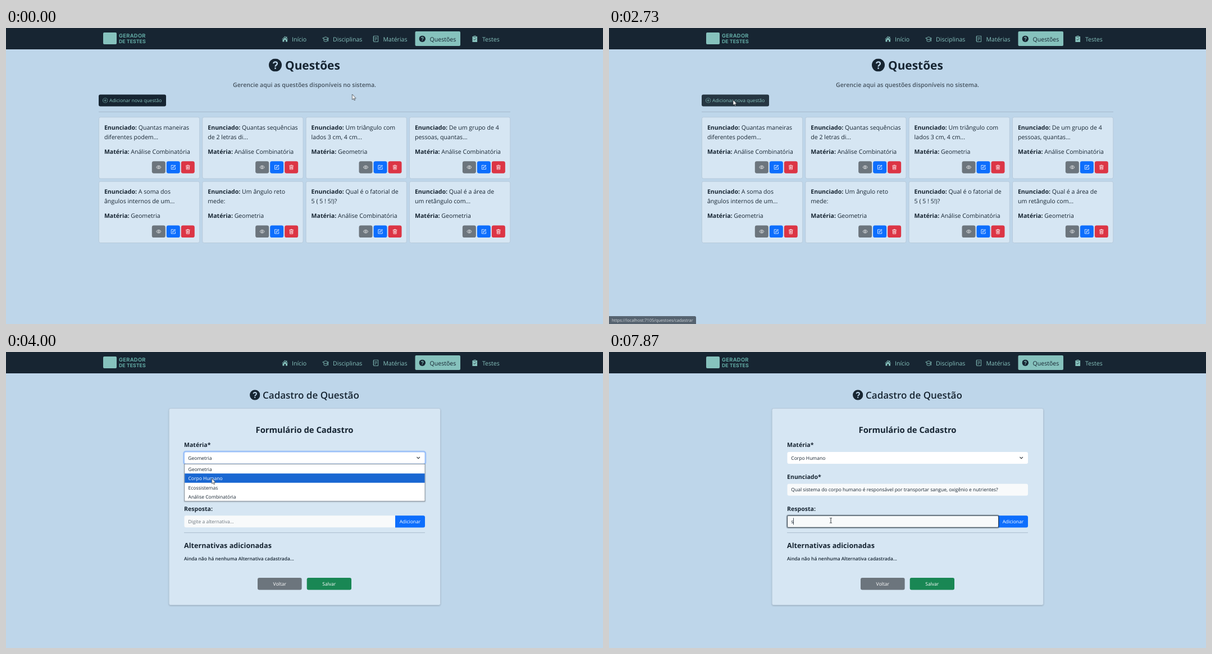
An HTML page for the animation above (8 s loop, 1063 by 527 pixels).

```html
<!DOCTYPE html>
<html lang="pt-BR">
<head>
<meta charset="utf-8">
<title>Questões</title>
<style>
html, body { margin: 0; width: 100%; height: 100%; overflow: hidden; background: #bed6ea; }
svg { display: block; }
#stage {
  width: 1063px; height: 527px; --ink: #172532; --teal: #86c2bd; --q: #bed6ea;
  font-family: "Open Sans", "Noto Sans", sans-serif; font-size: 10.58px;
  fill: var(--ink); color: var(--ink); text-rendering: geometricPrecision;
}
.b { font-weight: 700; }
.semi { font-weight: 600; }
.s { font-size: 8.53px; }
.mid { text-anchor: middle; }
.teal { fill: var(--teal); color: var(--teal); }
.white { fill: #fff; color: #fff; }
.hint { fill: #6c757d; }
.rule { stroke: #9fb2c4; stroke-width: .8; }
.panel { fill: #d6e6f3; stroke: #b3c6d7; stroke-width: .8; }
.brand { font: 700 9.3px Inter, sans-serif; fill: #62aaa4; }
.tip { font-size: 7.42px; fill: #cfd4d8; }
.ring { fill: none; stroke-width: 2.8; }
.blue { stroke: #9dc2f8; }

/* One percent of the loop is 80 ms. */
.anim, .list, .form { animation: 8s step-end infinite; }
.list { animation-name: list; }
.form { animation-name: form; }
@keyframes list { 0% { visibility: visible } 35.875%, 100% { visibility: hidden } }
@keyframes form { 0% { visibility: hidden } 35.875%, 100% { visibility: visible } }

.eyeHover { fill: #6c757d; animation: eyeHover 8s linear infinite; }
@keyframes eyeHover { 0%, 11.6% { fill: #6c757d } 13.4%, 19.5% { fill: #5c636a } 21.4%, 100% { fill: #6c757d } }
.addHover { animation: addHover 8s linear infinite; }
@keyframes addHover { 0%, 31% { fill: #172532 } 32.9%, 100% { fill: #263642 } }

.tipView { animation: tipView 8s linear infinite; }
@keyframes tipView { 0%, 12% { opacity: 0 } 14.2%, 21.2% { opacity: 1 } 23.7%, 100% { opacity: 0 } }
.tipAdd { animation: tipAdd 8s linear infinite; }
@keyframes tipAdd { 0%, 31.6% { opacity: 0 } 33.2%, 35.874% { opacity: 1 } 35.875%, 100% { opacity: 0 } }

.menu { animation-name: menu; }
@keyframes menu { 0% { opacity: 0 } 44.2% { opacity: 1 } 53.375%, 100% { opacity: 0 } }
.row1 { animation-name: row1; }
@keyframes row1 { 0% { opacity: 1 } 50%, 100% { opacity: 0 } }
.row2 { animation-name: row2; }
@keyframes row2 { 0% { opacity: 0 } 50%, 100% { opacity: 1 } }
.light1 { animation-name: light1; }
@keyframes light1 { 0% { fill: #fff } 50%, 100% { fill: #172532 } }
.light2 { animation-name: light2; }
@keyframes light2 { 0% { fill: #172532 } 50%, 100% { fill: #fff } }
.before { animation-name: before; }
@keyframes before { 0% { opacity: 1 } 53.375%, 100% { opacity: 0 } }
.after { animation-name: after; }
@keyframes after { 0% { opacity: 0 } 53.375%, 100% { opacity: 1 } }

.ringSelect { animation: ringSelect 8s linear infinite; }
@keyframes ringSelect { 0%, 45% { opacity: 0 } 46.9%, 65.6% { opacity: 1 } 66.7%, 100% { opacity: 0 } }
.ringText { animation: ringText 8s linear infinite; }
@keyframes ringText { 0%, 65.6% { opacity: 0 } 66.7%, 87.5% { opacity: 1 } 89.4%, 100% { opacity: 0 } }
.ringAnswer { animation: ringAnswer 8s linear infinite; }
@keyframes ringAnswer { 0%, 87.5% { opacity: 0 } 89.4%, 100% { opacity: 1 } }

.askHint { animation-name: askHint; }
@keyframes askHint { 0% { opacity: 1 } 77.5%, 100% { opacity: 0 } }
.ask { animation-name: ask; }
@keyframes ask { 0% { opacity: 0 } 77.5%, 100% { opacity: 1 } }
.replyHint { animation-name: replyHint; }
@keyframes replyHint { 0% { opacity: 1 } 98.375%, 100% { opacity: 0 } }
.reply { animation-name: reply; }
@keyframes reply { 0% { opacity: 0 } 98.375%, 100% { opacity: 1 } }
.caret1 { animation-name: caret1; }
@keyframes caret1 { 0% { opacity: 0 } 65.875% { opacity: 1 } 72.5%, 100% { opacity: 0 } }
.caret2 { animation-name: caret2; }
@keyframes caret2 { 0% { opacity: 0 } 77.5% { opacity: 1 } 84.125%, 100% { opacity: 0 } }
.caret3 { animation-name: caret3; }
@keyframes caret3 { 0% { opacity: 0 } 87.5% { opacity: 1 } 94.125%, 100% { opacity: 0 } }

.cursor { animation: move 8s linear infinite; }
@keyframes move {
  0%, .875% { transform: translate(616.5px, 118px) }
  1.75% { transform: translate(611px, 112.5px); animation-timing-function: cubic-bezier(.35, .1, .5, 1) }
  10.875% { transform: translate(264px, 230.5px) }
  14.5%, 19.125% { transform: translate(271px, 245px) }
  23.375% { transform: translate(241px, 194px) }
  25%, 28.375% { transform: translate(233px, 147px) }
  33.5%, 39.125% { transform: translate(221px, 128px); animation-timing-function: ease-in-out }
  44.4%, 46.5% { transform: translate(348px, 192px) }
  50%, 57.5% { transform: translate(366.5px, 225px) }
  61.625%, 80% { transform: translate(371px, 247px) }
  81.625% { transform: translate(372.5px, 271px) }
  86.625%, 100% { transform: translate(395px, 300px) }
}
.arrow { fill: #fff; stroke: #20262c; stroke-width: .7; animation-name: arrow; }
.beam { fill: none; stroke: #20262c; stroke-width: .9; animation-name: beam; }
@keyframes arrow { 0%, 24.1%, 80.5% { opacity: 1 } 21.6%, 59.2%, 85%, 100% { opacity: 0 } }
@keyframes beam { 0%, 24.1%, 80.5% { opacity: 0 } 21.6%, 59.2%, 85%, 100% { opacity: 1 } }
</style>
</head>
<body>
<svg id="stage" viewBox="0 0 1063 527">
  <defs>
    <filter id="soft" x="-10%" y="-10%" width="120%" height="130%">
      <feDropShadow dx="0" dy="1" stdDeviation="1.2" flood-opacity=".22"/>
    </filter>
    <g fill="none" stroke="currentColor" stroke-width="1.2">
      <symbol id="home" viewBox="0 0 16 16"><path fill="currentColor" stroke="none" d="M8 .8.6 8.2l.9.8L8 2.6 14.5 9l.9-.8-2.4-2.4V2h-2v1.8zM8 4l6 6v4.5H9.8V10H6.2v4.5H2V10z"/></symbol>
      <symbol id="cap" viewBox="0 0 16 16"><path fill="none" stroke="currentColor" stroke-width="1.2" d="M1 5.6 8.2 2.4 15 5.6 8 9.2zM4 7.6v4.6c2 1.4 5 2 8 .3V7.6M14 6.2V13"/></symbol>
      <symbol id="book" viewBox="0 0 16 16"><path fill="none" stroke="currentColor" stroke-width="1.2" d="M3 .8h11v14.4H3zM1 4h3M1 8h3M1 12h3M6 5h5.5M6 8h5.5M6 11h3"/></symbol>
      <symbol id="ask" viewBox="0 0 16 16"><circle cx="8" cy="8" r="8" fill="currentColor"/><path fill="none" stroke="var(--q)" stroke-width="1.6" d="M5.7 6.1C5.7 3.4 10.4 3.4 10.4 6.2 10.4 8 8 8 8 9.9M8 11v1.8"/></symbol>
      <symbol id="clip" viewBox="0 0 16 16"><path fill="currentColor" d="M2 2h3V.5h6V2h3v14H2z"/><path fill="none" stroke="#172532" stroke-width="1.2" d="M5 3.2h6M5 9l2.2 2.2L11.2 7"/></symbol>
      <symbol id="eye" viewBox="0 0 16 16"><path fill="none" stroke="currentColor" stroke-width="1.3" d="M.8 8C4 1.7 12 1.7 15.2 8 12 14.3 4 14.3.8 8z"/><circle cx="8" cy="8" r="2.4" fill="none" stroke="currentColor" stroke-width="1.3"/></symbol>
      <symbol id="edit" viewBox="0 0 16 16"><path fill="none" stroke="currentColor" stroke-width="1.4" d="M9 2H1.7v12.5h12.6V8M5.6 10.6l.6-2.6L13 1.2l2 2L8.2 10zM11.6 2.6l2 2"/></symbol>
      <symbol id="bin" viewBox="0 0 16 16"><path fill="none" stroke="currentColor" stroke-width="1.3" d="M1.5 3.2h13M6 3V1.2h4V3M3 3.5l.6 11.7h8.8L13 3.5M5.8 5.5v7.5M8 5.5v7.5M10.2 5.5v7.5"/></symbol>
      <symbol id="plus" viewBox="0 0 16 16"><path fill="none" stroke="currentColor" stroke-width="1.2" d="M8 .7a7.3 7.3 0 1 0 .01 0zM8 4v8M4 8h8"/></symbol>
    </g>
  </defs>

  <rect width="1063" height="527" fill="#bed6ea"/>
  <rect width="1063" height="38" fill="#172532"/>
  <rect x="173" y="8" width="24" height="21" rx="2" class="teal"/>
  <g class="brand">
    <text x="201" y="17" letter-spacing=".3">GERADOR</text>
    <text x="201" y="27" font-size="8.8">DE TESTES</text>
  </g>
  <g class="teal">
    <use href="#home" x="491" y="14" width="11.5" height="11.5"/><text x="509" y="24">Início</text>
    <use href="#cap" x="563" y="14" width="12" height="12"/><text x="582" y="24">Disciplinas</text>
    <use href="#book" x="652.5" y="13.5" width="11.5" height="11.5"/><text x="671.5" y="24">Matérias</text>
    <use href="#clip" x="829" y="13.5" width="11.5" height="11.5"/><text x="848" y="24">Testes</text>
    <rect x="728.5" y="6" width="80.5" height="26" rx="2"/>
  </g>
  <use href="#ask" x="735.5" y="13.5" width="11.5" height="11.5" style="--q: #86c2bd"/>
  <text x="754.5" y="24">Questões</text>

  <g class="list">
    <use href="#ask" x="468" y="54.5" width="23" height="23"/>
    <text x="497" y="73.7" class="b" font-size="20.9">Questões</text>
    <text x="531.5" y="105" class="semi mid" fill="#45525e">Gerencie aqui as questões disponíveis no sistema.</text>
    <rect x="165" y="118.5" width="120" height="21" rx="3" class="addHover"/>
    <g class="teal">
      <use href="#plus" x="172" y="124.3" width="9.3" height="9.3"/>
      <text x="184" y="132.3" class="s">Adicionar nova questão</text>
    </g>
    <path class="rule" d="M165 149.3H898"/>
    <g id="cards"></g>
    <g class="tipView">
      <path fill="#566370" d="M0 513H307q2.5 0 2.5 2.5V527H0z"/>
      <text x="5" y="522.7" class="tip">https://localhost:7105/questoes/detalhes/2dc259b8-bbae-4ddd-a288-0eb3205764ef</text>
    </g>
    <g class="tipAdd">
      <path fill="#566370" d="M0 513H152.500q2.500 0 2.500 2.500V527H0z"/>
      <text x="5" y="522.7" class="tip">https://localhost:7105/questoes/cadastrar</text>
    </g>
  </g>

  <g class="form">
    <use href="#ask" x="434" y="67.3" width="18.4" height="18.4"/>
    <text x="457" y="83" class="semi" font-size="17">Cadastro de Questão</text>
    <rect x="290.200" y="100.400" width="483.300" height="350.200" rx="3" class="panel" filter="url(#soft)"/>
    <text x="531.5" y="143.700" class="b mid" font-size="14.8">Formulário de Cadastro</text>
    <g class="b">
      <text x="317" y="169.300">Matéria*</text>
      <text x="317" y="226">Enunciado*</text>
      <text x="317" y="282.700">Resposta:</text>
      <text x="317" y="349" font-size="12.6">Alternativas adicionadas</text>
    </g>
    <path class="rule" d="M317 321.700H746"/>
    <text x="317" y="371.300" class="semi" font-size="8.42">Ainda não há nenhuma Alternativa cadastrada...</text>

    <rect x="317.500" y="178" width="428.500" height="21" rx="3" fill="#fff"/>
    <rect x="317.500" y="234.700" width="428.500" height="21" rx="3" fill="#f8fafb"/>
    <path fill="#f8fafb" d="M693 291.300V312.300H320.500q-3 0-3-3V294.300q0-3 3-3z"/>
    <path fill="#0d6efd" d="M693 291.200H743q3 0 3 3V309.400q0 3-3 3H693z"/>
    <rect x="448" y="402" width="78.600" height="21.500" rx="3" fill="#6c757d"/>
    <rect x="535.700" y="402" width="79.300" height="21.500" rx="3" fill="#198754"/>
    <path d="M731.500 187l2.700 2.700 2.700-2.700" fill="none" stroke="#343a40" stroke-width="1.100"/>

    <rect class="ring blue ringSelect" x="316.600" y="177.100" width="430.300" height="22.800" rx="3.500"/>
    <g class="ringText" fill="none">
      <rect x="316.600" y="233.800" width="430.300" height="22.800" rx="3.500" stroke="#1725324d" stroke-width="2"/>
      <rect x="317.500" y="234.700" width="428.500" height="21" rx="3" stroke="#33414d"/>
    </g>
    <g class="ringAnswer" fill="none">
      <rect x="316.600" y="290.400" width="377.500" height="22.800" rx="2.500" stroke="#1725324d" stroke-width="2"/>
      <rect x="317.500" y="291.300" width="376" height="21" rx="2" stroke="#33414d"/>
    </g>

    <g class="s">
      <g class="white mid">
        <text x="719.500" y="305">Adicionar</text>
        <text x="487.300" y="416">Voltar</text>
        <text x="575.300" y="416">Salvar</text>
      </g>
      <text x="324.300" y="192" class="anim before">Geometria</text>
      <text x="324.300" y="192" class="anim after">Corpo Humano</text>
      <text x="324.300" y="248.300" class="hint anim askHint">Digite o enunciado da questão...</text>
      <text x="324.300" y="248.300" class="anim ask">Qual sistema do corpo humano é responsável por transportar sangue, oxigênio e nutrientes?</text>
      <text x="324.300" y="305" class="hint anim replyHint">Digite a alternativa...</text>
      <text x="324.300" y="305" class="anim reply">s</text>
    </g>
    <rect class="anim caret1" x="325" y="239" width=".8" height="12"/>
    <rect class="anim caret2" x="694.200" y="239" width=".8" height="12"/>
    <rect class="anim caret3" x="325" y="295.500" width=".8" height="12"/>
    <rect class="anim reply" x="328.200" y="295.500" width=".8" height="12"/>

    <g class="anim menu s">
      <rect x="317.800" y="199.400" width="428.200" height="66.300" fill="#fff" stroke="#6f7a84" stroke-width=".8" filter="url(#soft)"/>
      <rect class="anim row1" x="318.200" y="199.800" width="427.400" height="16.500" fill="#1967d2"/>
      <rect class="anim row2" x="318.200" y="216.300" width="427.400" height="16.500" fill="#1967d2"/>
      <text x="324.500" y="211.600" class="anim light1">Geometria</text>
      <text x="324.500" y="228.100" class="anim light2">Corpo Humano</text>
      <text x="324.500" y="244.600">Ecossistemas</text>
      <text x="324.500" y="261.100">Análise Combinatória</text>
    </g>
  </g>

  <g class="cursor">
    <path class="anim arrow" d="M0 0V9.600L2.200 7.600 3.700 10.800 5.100 10.200 3.700 7.100H6.500z"/>
    <path class="anim beam" d="M-2-4.300H-.5L0-3.800.5-4.300H2M0-3.800V3.800M-2 4.300H-.5L0 3.800.5 4.300H2"/>
  </g>
</svg>
<script>
const algebra = 'Análise Combinatória', shapes = 'Geometria';
const cards = [
  ['Quantas maneiras', 'diferentes podem...', algebra],
  ['Quantas sequências', 'de 2 letras di...', algebra],
  ['Um triângulo com', 'lados 3 cm, 4 cm...', shapes],
  ['De um grupo de 4', 'pessoas, quantas...', algebra],
  ['A soma dos', 'ângulos internos de um...', shapes],
  ['Um ângulo reto', 'mede:', shapes],
  ['Qual é o fatorial de', '5 ( 5 ! 5!)?', algebra],
  ['Qual é a área de', 'um retângulo com...', shapes]
];
const buttons = [['eye', '#6c757d'], ['edit', '#0d6efd'], ['bin', '#dc3545']];

const button = ([icon, fill], i, hover) => {
  const x = 94.4 + i * 26;
  return `<rect x="${x}" y="78.400" width="24" height="21.500" rx="3.400" fill="${fill}" class="${hover ? 'eyeHover' : ''}"/>
    <use href="#${icon}" x="${x + 7.4}" y="84.500" width="9.200" height="9.200" class="white"/>`;
};

const card = ([first, second, topic], n) => `
  <g transform="translate(${165.4 + n % 4 * 184.35} ${158.8 + Math.floor(n / 4) * 114.4})">
    <rect width="179.300" height="109.300" rx="3" class="panel"/>
    <text x="9.500" y="22.200"><tspan class="b">Enunciado:</tspan> ${first}</text>
    <text x="9.500" y="39.200">${second}</text>
    <text x="9.500" y="65.300"><tspan class="b">Matéria:</tspan> ${topic}</text>
    ${buttons.map((b, i) => button(b, i, n + i === 0)).join('')}
  </g>`;

document.getElementById('cards').innerHTML = cards.map(card).join('');
</script>
</body>
</html>
```
